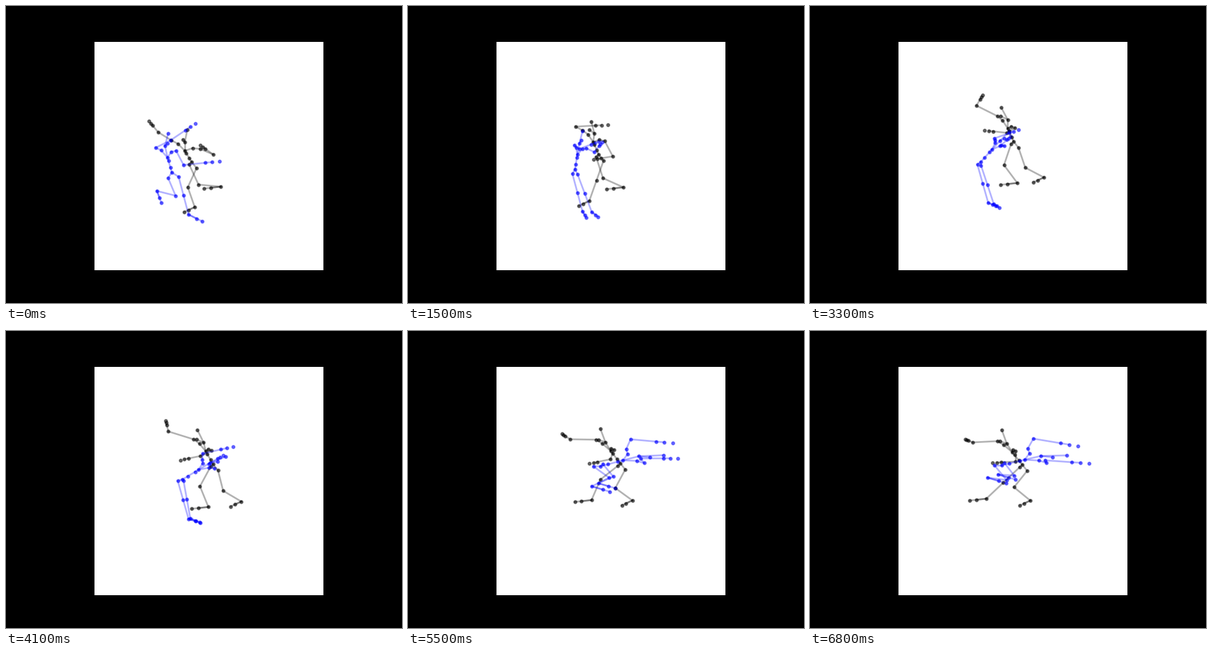
Write a matplotlib script that moves like this. It is 640 px wide and 480 px high and loops after 6.9 s.

```python
import numpy as np
import matplotlib.pyplot as plt
from matplotlib.animation import FuncAnimation
from matplotlib.collections import LineCollection

FRAMES, STEP = 69, 100
BEATS = {5: (0, 15, 33, 49, 60), 3: (0, 24, 60)}  # frames of the key points
REST = 60

# Joints: spine 0-3, head 4-6, then per side an arm of 6 and a leg of 5.
BONES = [(0, 1), (1, 2), (2, 3), (3, 4), (4, 5), (4, 6)]
for arm in (7, 18):
    hip = arm + 6
    BONES += [(3, arm)] + [(arm + i, arm + i + 1) for i in range(4)]
    BONES += [(0, hip), (hip, hip + 1), (hip + 1, hip + 2),
              (hip + 2, hip + 3), (hip + 2, hip + 4)]


def smooth(u):
    u = np.clip(u, 0, 1)
    return u * u * (3 - 2 * u)


def path(*points):
    """Smooth curve through points at the beats; one point stands still."""
    p = np.array(points, float)
    if len(p) == 1:
        return lambda t: p[0]
    beats = np.array(BEATS[len(p)])
    slope = np.gradient(p, beats, axis=0)
    slope[-1] = 0

    def at(t):
        t = min(t, beats[-1])
        k = min(np.searchsorted(beats, t, side="right"), len(p) - 1) - 1
        span = beats[k + 1] - beats[k]
        u = (t - beats[k]) / span
        bend = (1 - u) * slope[k] - u * slope[k + 1]
        return p[k] + (p[k + 1] - p[k]) * smooth(u) + span * u * (1 - u) * bend
    return at


def arm_joints(chest, neck, shoulder, elbow, tip):
    """Collarbone follows the shoulder; the forearm and hand are straight."""
    collar = chest + 0.5 * shoulder + 0.2 * neck
    forearm = [elbow + f * (tip - elbow) for f in (0.61, 0.8)]
    return [collar, chest + shoulder, elbow, *forearm, tip]


def leg_joints(hip, ankle, toe, bone):
    """Two equal bones; the sign of bone picks the side the knee bends to."""
    dx, dy = ankle - hip
    length = np.hypot(dx, dy)
    out = np.sqrt(max(bone ** 2 - length ** 2 / 4, 0)) * np.sign(bone)
    knee = (hip + ankle) / 2 + out * np.array([dy, -dx]) / length
    return [hip, knee, ankle, ankle + 0.6 * toe, ankle + toe]


class Dancer:
    def __init__(self, ax, color, body, sides, recoil):
        self.body, self.sides = body, sides
        self.recoil = np.array(recoil)
        self.dots = ax.scatter([], [], s=10, c=color, alpha=0.5,
                               linewidths=1.5, zorder=1)
        self.bones = LineCollection([], colors=color, alpha=0.3, linewidths=2,
                                    capstyle="projecting", zorder=2)
        ax.add_collection(self.bones, autolim=False)

    def pose(self, t):
        root, back, neck, nose, head = (p(t) for p in self.body)
        chest = root + back
        top = chest + neck
        joints = [root, root + 0.33 * back, root + 0.78 * back, chest,
                  top, top + nose, top + head]
        for bone, *paths in self.sides:
            shoulder, elbow, tip, hip, ankle, toe = (p(t) for p in paths)
            joints += arm_joints(chest, neck, shoulder, elbow, tip)
            joints += leg_joints(root + hip, ankle, toe, bone)
        return np.array(joints) + self.recoil * smooth((t - REST) / 8)

    def show(self, t):
        joints = self.pose(t)
        self.dots.set_offsets(joints)
        self.bones.set_segments([joints[[a, b]] for a, b in BONES])


fig = plt.figure(figsize=(6.4, 4.8), dpi=100, facecolor="black")
left, top, side = 143.2, 57.6, 369.6
ax = fig.add_axes([left / 640, 0.11, side / 640, 0.77], facecolor="white")
ax.set(xlim=(left, left + side), ylim=(top + side, top), xticks=[], yticks=[])
ax.spines[:].set_visible(False)

# Root, elbows, fingertips and ankles move on the stage, the rest on the body.
black = Dancer(
    ax, "black",
    body=[
        path((300, 252), (308, 240), (329, 219), (339, 214), (345, 214)),
        path((-11, -18), (-8, -21), (-16, -20)),
        path((0, -14), (2, -14), (-9, -14)),
        path((-3, -4), (-10, -6), (-11, -4)),
        path((4, -20), (-9, -19), (-8, -22))],
    sides=[
        (-36,
         path((-22, -17), (-16, -20), (-24, -18)),
         path((246, 204), (271, 195), (269, 161), (258, 169), (265, 178)),
         path((231, 186), (323, 192), (279, 144), (244, 154), (253, 173)),
         path((-4, 4)),
         path((347, 292), (348, 293), (335, 286), (315, 281), (287, 269)),
         path((-27, 3))),
        (-34,
         path((25, -3), (15, -1), (5, -2)),
         path((335, 240), (331, 243), (318, 205), (316, 204), (334, 209)),
         path((314, 225), (300, 248), (282, 201), (286, 219), (297, 211)),
         path((8, 10)),
         path((305, 325), (293, 315), (378, 277), (371, 277), (358, 272)),
         path((-17, 8)))],
    recoil=(-2, 2))

blue = Dancer(
    ax, "blue",
    body=[
        path((268, 269), (270, 264), (276, 252), (298, 227), (318, 215)),
        path((-7, -24), (10, -23), (37, -9)),
        path((-4, -19), (8, -17), (26, -6)),
        path((4, -4), (4, -5), (19, 2)),
        path((5, -20), (7, -19), (42, -1))],
    sides=[
        (31,
         path((-19, -16), (2, -15), (5, -18)),
         path((266, 217), (277, 231), (298, 214), (340, 183), (369, 172)),
         path((306, 190), (308, 219), (337, 200), (400, 178), (441, 184)),
         path((-6, 9), (-4, 6), (-12, 0)),
         path((244, 299), (282, 332), (288, 318), (300, 282), (295, 235)),
         path((7, 19), (7, 6), (30, 9))),
        (26,
         path((14, -11), (16, -9), (35, 5)),
         path((287, 257), (301, 236), (309, 225), (352, 206), (388, 207)),
         path((345, 251), (314, 220), (324, 211), (390, 196), (459, 212)),
         path((11, 7), (1, 8), (4, -4)),
         path((295, 337), (297, 333), (297, 320), (301, 278), (312, 230)),
         path((22, 11), (6, 6), (28, 8)))],
    recoil=(-8, 2))


def draw(frame):
    for dancer in (black, blue):
        dancer.show(frame)
    return []


anim = FuncAnimation(fig, draw, frames=FRAMES, interval=STEP, repeat=True,
                     repeat_delay=0, init_func=lambda: draw(0))
plt.show()
```
